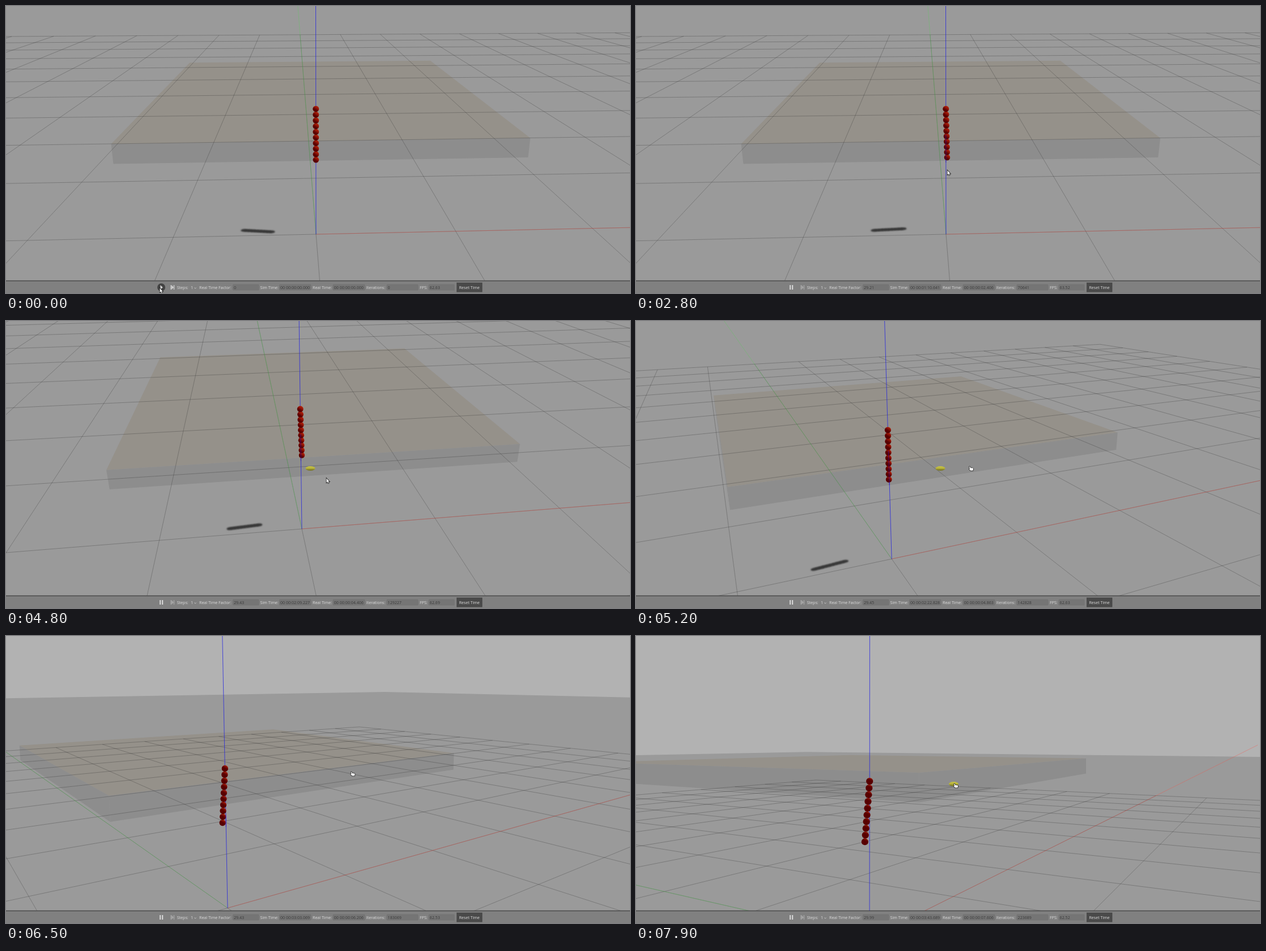
Recreate the animation shown at these times as an HTML page with a canvas. Size 1101x508 px, loop 8000 ms.

```html
<!DOCTYPE html>
<html lang="en">
<head>
<meta charset="utf-8">
<title>Hanging chain simulation</title>
<style>
  html, body { margin: 0; width: 1101px; height: 508px; overflow: hidden; background: #9a9a9a; }
  canvas, svg { position: absolute; left: 0; top: 0; display: block; }
  text { font: 7.1px "Open Sans", "Noto Sans", sans-serif; fill: #dedede; }
  .value { fill: #3a3a3a; }
  .field { fill: #757575; stroke: #6f6f6f; stroke-width: .6; }
  .icon { fill: #d2d2d2; }
</style>
</head>
<body>
<canvas id="scene" width="1101" height="508"></canvas>
<svg width="1101" height="508" viewBox="0 0 1101 508">
  <rect y="486" width="1101" height="22" fill="#808080"/>
  <rect y="485.7" width="1101" height="1.5" fill="#494949"/>
  <circle id="hover" cx="274" cy="498" r="7" fill="#424242"/>
  <path id="play" class="icon" d="M272.3 494l4.4 4-4.4 4z"/>
  <path id="pause" class="icon" d="M271 494h2.2v8H271zM275 494h2.2v8H275z"/>
  <path id="step" class="icon" d="M290.3 494h1.3v8h-1.3zM292 494l3.8 4-3.8 4zM295.8 494h1.3v8h-1.3z"/>
  <g class="field">
    <rect x="400.5" y="493" width="45.5" height="10" rx="1"/>
    <rect x="482.5" y="493" width="55.5" height="10" rx="1"/>
    <rect x="577" y="493" width="56" height="10" rx="1"/>
    <rect x="672" y="493" width="55" height="10" rx="1"/>
    <rect x="746" y="493" width="45" height="10" rx="1"/>
  </g>
  <text x="301.7" y="500.6">Steps:</text>
  <text x="326" y="500.6">1</text>
  <path d="M332.3 498.6l1.7 1.5 1.7-1.5" fill="none" stroke="#d2d2d2" stroke-width=".8"/>
  <text x="341" y="500.6">Real Time Factor:</text>
  <text x="448.6" y="500.6">Sim Time:</text>
  <text x="541" y="500.6">Real Time:</text>
  <text x="635.7" y="500.6">Iterations:</text>
  <text x="730" y="500.6">FPS:</text>
  <text class="value" id="rtf" x="402" y="500.6"></text>
  <text class="value" id="sim" x="484" y="500.6"></text>
  <text class="value" id="real" x="578.8" y="500.6"></text>
  <text class="value" id="iter" x="673.6" y="500.6"></text>
  <text class="value" id="fps" x="747.6" y="500.6"></text>
  <rect x="795.5" y="490" width="44.5" height="16" fill="#4a4a4a" stroke="#3e3e3e" stroke-width=".7"/>
  <text x="817.6" y="500.6" text-anchor="middle">Reset Time</text>
</svg>
<canvas id="pointer" width="1101" height="508"></canvas>
<script>
const LOOP = 8000, STEP = 100, START = 300;
const FOCAL = 955, CX = 550.5, CY = 185, NEAR = 0.05;
const $ = id => document.getElementById(id);
const ctx = $('scene').getContext('2d'), top2d = $('pointer').getContext('2d');

// Origin on screen (x, y), its depth, yaw, pitch
const HOME = [547, 404, 3.83, .043, .2804];
const TILTED = [522, 368, 3.905, .145, .386];
const LOW = [391, 481.5, 3.535, .649, .11];
const SIDE = [279, 546, 3.18, 1.046, -.005];
const VIEWS = [
  [4300, ...HOME], [4800, ...TILTED], [5500, 398, 461, 3.607, .63, .1668],
  [5700, ...LOW], [6700, ...LOW], [7300, ...SIDE], [7500, ...SIDE],
  [7900, 412, 535, 3.18, 1.046, -.005]
];
// Offset of the lowest bead (x, y)
const SWING = [
  [START, 0, 0], [2800, .01, .045], [4800, .012, .05], [5500, .014, .052],
  [6500, -.006, .036], [7300, 0, .035], [7900, 0, .035]
];
const POINTER = [
  [1300, 271.5, 499.5], [2000, 520, 322], [2800, 549.5, 291], [4300, 537, 261],
  [4800, 565.5, 278.5], [5500, 611, 248], [5700, 612, 244], [6700, 612, 244],
  [7300, 551, 268], [7550, 431, 275], [7900, 564.5, 265]
];
// Simulated and real seconds
const CLOCK = [
  [394, 0, 0], [2800, 70.641, 2.406], [4800, 129.227, 4.406], [5500, 153.029, 5.206],
  [6500, 183.069, 6.206], [7300, 207.006, 7.006], [7900, 223.689, 7.606]
];
const FACTOR = [
  [START, 0], [500, 28.4], [2800, 29.21], [4800, 29.43], [5500, 29.46],
  [6500, 29.43], [7300, 29.72], [7900, 29.99]
];
const RATES = [
  [0, 62.63], [100, 62.57], [1000, 62.6], [2200, 63.52], [3200, 62.6],
  [4100, 62.69], [5200, 62.63], [6100, 62.53], [7000, 62.52]
];

function track(keys, t) {
  const next = keys.findIndex(k => k[0] > t);
  if (next === 0) return keys[0].slice(1);
  if (next < 0) return keys[keys.length - 1].slice(1);
  const a = keys[next - 1], b = keys[next], u = (t - a[0]) / (b[0] - a[0]);
  return a.slice(1).map((v, i) => v + (b[i + 1] - v) * u);
}

const dot = (a, b) => a[0] * b[0] + a[1] * b[1] + a[2] * b[2];

function makeCamera([ox, oy, depth, yaw, pitch]) {
  const s = Math.sin(yaw), c = Math.cos(yaw), sp = Math.sin(pitch), cp = Math.cos(pitch);
  const right = [c, -s, 0], down = [-s * sp, -c * sp, -cp], ahead = [s * cp, c * cp, -sp];
  const o = [(ox - CX) / FOCAL * depth, (oy - CY) / FOCAL * depth, depth];
  return {
    right, down, ahead,
    x: -dot(o, [right[0], down[0], ahead[0]]),
    see: p => [o[0] + dot(right, p), o[1] + dot(down, p), o[2] + dot(ahead, p)]
  };
}

const flat = ([x, y, z]) => [CX + FOCAL * x / z, CY + FOCAL * y / z];

function cut(a, b) {
  const u = (NEAR - a[2]) / (b[2] - a[2]);
  return a.map((v, i) => v + (b[i] - v) * u);
}

function segment(cam, p, q) {
  let a = cam.see(p), b = cam.see(q);
  if (a[2] < NEAR && b[2] < NEAR) return;
  if (a[2] < NEAR) a = cut(a, b);
  if (b[2] < NEAR) b = cut(b, a);
  ctx.moveTo(...flat(a));
  ctx.lineTo(...flat(b));
}

function line(cam, p, q, color, width = 1) {
  ctx.beginPath();
  segment(cam, p, q);
  ctx.strokeStyle = color;
  ctx.lineWidth = width;
  ctx.stroke();
}

function polygon(cam, points, color) {
  const seen = points.map(cam.see), out = [];
  seen.forEach((b, i) => {
    const a = seen[(i + seen.length - 1) % seen.length];
    if ((a[2] < NEAR) !== (b[2] < NEAR)) out.push(cut(a, b));
    if (b[2] >= NEAR) out.push(b);
  });
  ctx.beginPath();
  out.forEach(p => ctx.lineTo(...flat(p)));
  ctx.closePath();
  ctx.fillStyle = color;
  ctx.fill();
}

const square = (r, z) => [[-r, -r, z], [r, -r, z], [r, r, z], [-r, r, z]];

function drawBox(cam) {
  const lo = square(1, .95), hi = square(1, 1.05);
  polygon(cam, hi, '#95918a');
  polygon(cam, [lo[0], lo[1], hi[1], hi[0]], '#8d8d8d');
  if (cam.x < -1) polygon(cam, [lo[0], lo[3], hi[3], hi[0]], '#8d8d8d');
}

function drawGrid(cam) {
  ctx.beginPath();
  for (let i = -10; i <= 10; i++) {
    segment(cam, [i, -10, 0], [i, 10, 0]);
    segment(cam, [-10, i, 0], [10, i, 0]);
  }
  ctx.strokeStyle = 'rgba(40,40,40,.34)';
  ctx.lineWidth = .85;
  ctx.stroke();
}

function drawShadow(cam, beads) {
  ctx.filter = 'blur(.8px)';
  for (const [x, y, z] of beads) {
    const ring = Array.from({ length: 14 }, (_, i) => {
      const a = i * Math.PI / 7;
      return [x - z * .556 + .023 * Math.cos(a), y + z * .085 + .02 * Math.sin(a), 0];
    });
    polygon(cam, ring, '#383838');
  }
  ctx.filter = 'none';
}

const LIGHT = [.483, -.097, .87];

function drawBead(cam, p) {
  const seen = cam.see(p), [x, y] = flat(seen), r = .0205 * FOCAL / seen[2];
  const lx = dot(LIGHT, cam.right), ly = dot(LIGHT, cam.down), lz = -dot(LIGHT, cam.ahead);
  const len = Math.hypot(lx, ly), gx = lx / len * r, gy = ly / len * r;
  const fill = ctx.createLinearGradient(x - gx, y - gy, x + gx, y + gy);
  for (let s = -1; s <= 1; s += .25) {
    const k = Math.max(0, s * len + Math.sqrt(1 - s * s) * lz);
    fill.addColorStop((s + 1) / 2, `rgb(${88 + 90 * k},${32 * k},${10 * k})`);
  }
  ctx.beginPath();
  ctx.arc(x, y, r, 0, 7);
  ctx.fillStyle = fill;
  ctx.fill();
}

function drawChain(cam, beads) {
  const order = beads.slice().sort((a, b) => cam.see(b)[2] - cam.see(a)[2]);
  order.forEach(p => drawBead(cam, p));
  // The axis shows in front of beads that swung behind it
  for (const [x, y, z] of beads) {
    if (dot(cam.ahead, [x, y, 0]) > .022)
      line(cam, [0, 0, z - .02], [0, 0, z + .02], 'rgba(50,10,180,.6)');
  }
}

function drawMarker(x, y) {
  const fill = ctx.createLinearGradient(0, y - 4, 0, y + 4);
  fill.addColorStop(0, '#c9c545');
  fill.addColorStop(.5, '#b5b13a');
  fill.addColorStop(.75, '#85822c');
  fill.addColorStop(1, '#77742a');
  ctx.beginPath();
  ctx.ellipse(x, y, 8.6, 4, 0, 0, 7);
  ctx.fillStyle = fill;
  ctx.fill();
}

const ARROW = new Path2D('M0 0V7.6L1.7 6.1 2.9 8.8 4.1 8.2 2.9 5.7H5.2Z');
const HAND = new Path2D('M-3.4-2.6C-3.6-3.6-2.3-3.9-1.9-3L-1-1.1 2.6-.7C3.6-.5 3.7 0 3.6 1L3 3.6H-1.4L-3.6 1.3C-4.2.4-3.2-.2-2.4.3Z');

function drawPointer(t) {
  const [x, y] = track(POINTER, t), shape = t < 5000 ? ARROW : HAND;
  top2d.clearRect(0, 0, 1101, 508);
  top2d.save();
  top2d.translate(x, y);
  top2d.lineWidth = 1.5;
  top2d.strokeStyle = '#1c1c1c';
  top2d.stroke(shape);
  top2d.fillStyle = '#f6f6f6';
  top2d.fill(shape);
  top2d.restore();
}

function drawScene(t) {
  const cam = makeCamera(track(VIEWS, t)), [sx, sy] = track(SWING, t);
  const beads = Array.from({ length: 10 }, (_, i) => [sx * i / 9, sy * i / 9, .925 - .04 * i]);
  ctx.fillStyle = '#b2b2b2';
  ctx.fillRect(0, 0, 1101, 508);
  polygon(cam, square(50, 0), '#9a9a9a');
  drawShadow(cam, beads);
  drawBox(cam);
  drawGrid(cam);
  line(cam, [0, 0, 0], [400, 0, 0], 'rgba(255,70,60,.45)', .8);
  line(cam, [0, 0, 0], [0, 400, 0], 'rgba(80,210,80,.45)', .8);
  line(cam, [0, 0, 0], [0, 0, 10], 'rgba(32,32,225,.85)', .9);
  drawChain(cam, beads);
  if (t >= 4400 && t < 5700) drawMarker(537, 261);
  if (t >= 7600) {
    const [x, y] = track(POINTER, t);
    drawMarker(x - 4, y - 3);
  }
}

const pad = (n, size = 2) => String(n).padStart(size, '0');

function clock(seconds) {
  const ms = Math.round(seconds * 1000), s = Math.floor(ms / 1000);
  return `00 00:${pad(Math.floor(s / 60))}:${pad(s % 60)}.${pad(ms % 1000, 3)}`;
}

function drawToolbar(t) {
  const running = t >= START, [sim, real] = track(CLOCK, t), [factor] = track(FACTOR, t);
  $('hover').style.display = t < 1400 ? '' : 'none';
  $('play').style.display = running ? 'none' : '';
  $('pause').style.display = running ? '' : 'none';
  $('step').style.fill = running ? '#a6a6a6' : '';
  $('rtf').textContent = factor ? factor.toFixed(2) : '0';
  $('sim').textContent = clock(sim);
  $('real').textContent = clock(real);
  $('iter').textContent = Math.round(sim * 1000);
  $('fps').textContent = RATES.filter(r => r[0] <= t).pop()[1].toFixed(2);
}

const begin = performance.now();
let shown = -1;

function frame() {
  const t = Math.floor((performance.now() - begin) % LOOP / STEP) * STEP;
  if (t !== shown) {
    shown = t;
    drawScene(t);
    drawToolbar(t);
    drawPointer(t);
  }
  requestAnimationFrame(frame);
}
frame();
</script>
</body>
</html>
```
